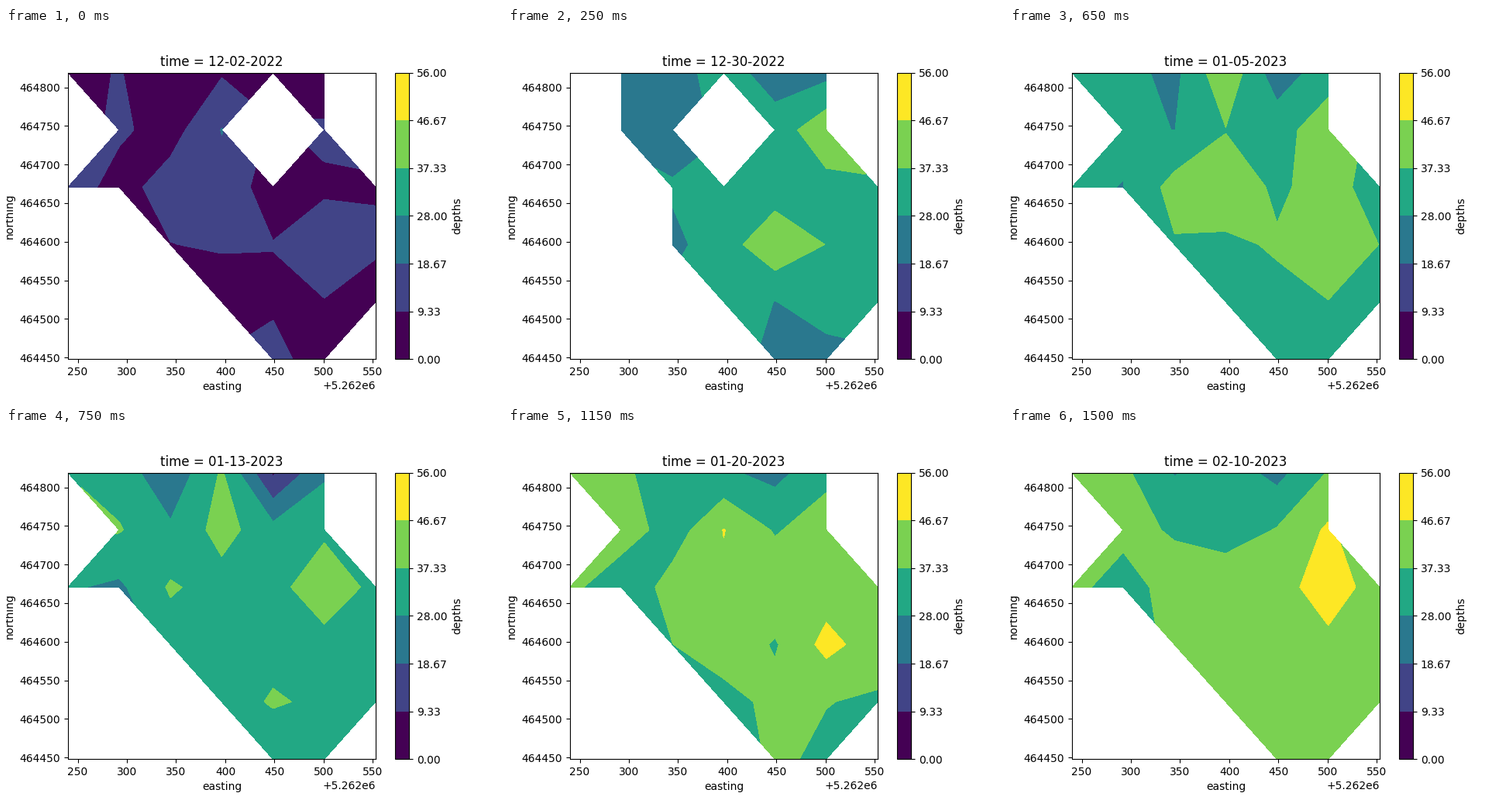
Recreate the animation shown at these times as a matplotlib script. Size 640 px wide and 480 px high, loop 1.75 s.

```python
import numpy as np
import matplotlib.pyplot as plt
from matplotlib.animation import FuncAnimation
from matplotlib.cm import ScalarMappable
from matplotlib.colors import BoundaryNorm

plt.rcParams["font.family"] = "DejaVu Sans"

fig, ax = plt.subplots(figsize=(6.4, 4.8), dpi=100)
levels = np.linspace(0, 56, 7)
cmap = plt.get_cmap("viridis", 6)
norm = BoundaryNorm(levels, 6)
bar = fig.colorbar(ScalarMappable(norm, cmap), ax=ax, ticks=levels,
                   format="%.2f", label="depths")
bar.ax.minorticks_off()

# Coarse survey grid: 7 columns by 6 rows, north first
east = np.linspace(5262240.15, 5262552.63, 7)
north = np.linspace(464819, 464448, 6)
o = np.nan  # no sounding at this node


def survey(date, *rows):
    """Contours interpolated between the soundings of one day."""
    if not rows:
        return date, None
    depth = np.ma.masked_invalid(rows)
    return date, ax.contourf(east, north, depth, levels, cmap=cmap, norm=norm)


surveys = [
    survey("12-02-2022",
           [5.1, 10.1, 0, 8.4, 0.4, 0, o],
           [o, 10.9, 5.4, 19, o, 11.5, o],
           [14.4, 5.5, 13.9, 15.6, 4.3, 7.6, 8.3],
           [o, o, 9.1, 10.7, 9.7, 15.7, 11.5],
           [o, o, o, 2, 6.7, 8.9, 3],
           [o, o, o, o, 14.9, 0.5, o]),
    survey("12-30-2022",
           [o, 24, 24.2, 32, 23.8, 25, o],
           [o, 25.8, 22.5, o, 31.9, 44.3, o],
           [o, o, 29.1, 33.8, 31.7, 33.9, 35.3],
           [o, o, 25.9, 32.6, 45.3, 37.1, 34],
           [o, o, o, 36.9, 27.7, 34, 36.3],
           [o, o, o, o, 24.5, 23.2, o]),
    survey("01-05-2023",
           [31, 30.8, 25.5, 44.7, 22.2, 33.5, o],
           [o, 29.4, 27.9, 37, 34, 42.3, o],
           [29.2, 27.8, 40.9, 42.5, 35.9, 40.8, 33.4],
           [o, o, 36.5, 35.8, 38.2, 44, 37.2],
           [o, o, o, 33, 35.1, 37.1, 35],
           [o, o, o, o, 32, 33, o]),
    survey("01-13-2023",
           [37.1, 33.2, 20.7, 38.5, 8, 26.5, o],
           [o, 38, 29.6, 40.8, 31.3, 35, o],
           [29, 26.2, 38.5, 33.3, 33, 45.4, 34],
           [o, o, 32.1, 33, 34.2, 32.9, 33],
           [o, o, o, 32.7, 38.3, 35.6, 33],
           [o, o, o, o, 30.1, 32, o]),
    survey("01-20-2023",
           [41, 40, 29.6, 29.4, 25.1, 34.5, o],
           [o, 43.5, 32.1, 47, 36.4, 42.6, o],
           [40.3, 29.2, 41.5, 44.6, 44.5, 42, 43],
           [o, o, 37.2, 43.8, 36.4, 49.6, 41.9],
           [o, o, o, 33, 40.5, 37.6, 36.1],
           [o, o, o, o, 39, 35.5, o]),
    survey("02-01-2023"),
    survey("02-10-2023",
           [41, 39.3, 27.4, 33.1, 25, 37.9, o],
           [o, 39.7, 36.5, 31.3, 38, 48.1, o],
           [39.6, 33.6, 40.9, 46, 42.4, 52, 42],
           [o, o, 39.6, 42, 42, 44, 42],
           [o, o, o, 41, 41, 41, 41],
           [o, o, o, o, 41, 41, o]),
]

ax.set(xlim=east[[0, -1]], ylim=north[[-1, 0]],
       xlabel="easting", ylabel="northing")
title = ax.set_title("")


def show(i):
    for k, (_, contours) in enumerate(surveys):
        if contours is not None:
            contours.set_visible(k == i)
    title.set_text(f"time = {surveys[i][0]}")
    return [title]


anim = FuncAnimation(fig, show, frames=len(surveys), interval=250, repeat=True)
plt.show()
```
